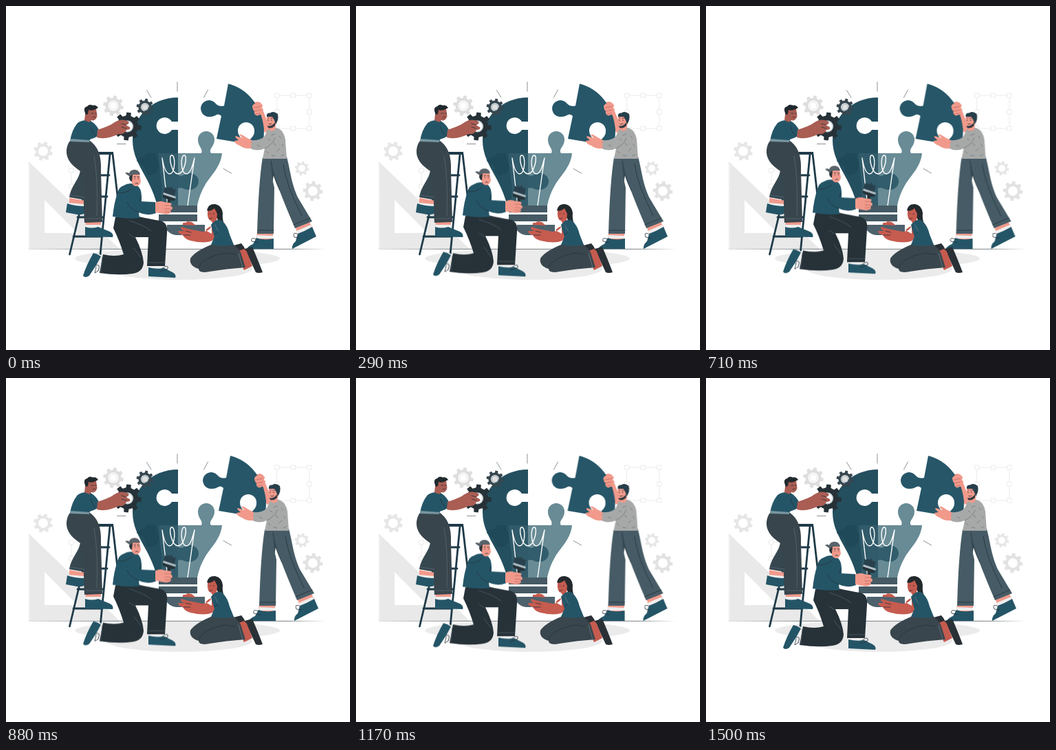
An HTML page for the animation above (1540 ms loop, 500 by 500 pixels).

```html
<!DOCTYPE html>
<html lang="en">
<head>
<meta charset="utf-8">
<title>Building an idea</title>
<style>
html, body { margin: 0; width: 100%; height: 100%; overflow: hidden; background: #fff; }
svg { display: block; width: 100%; height: 100%; }
.line { fill: none; stroke-linecap: round; stroke-linejoin: round; }
.teal { fill: #245567; }
.coal { fill: #29414c; }
.ink { stroke: #263238; stroke-width: .8; }
.pale { stroke: #78909c; stroke-width: .6; }
.tan { fill: #f19a8c; }
.brown { fill: #aa5d53; }
.red { fill: #c65b4f; }
</style>
</head>
<body>
<svg viewBox="0 0 500 500">
  <defs>
    <linearGradient id="fade">
      <stop offset="0" stop-color="#263238" stop-opacity=".08"/>
      <stop offset=".3" stop-color="#263238"/>
      <stop offset=".88" stop-color="#263238"/>
      <stop offset="1" stop-color="#263238" stop-opacity=".05"/>
    </linearGradient>
  </defs>

  <g id="back">
    <path fill="#e9e9e9" fill-rule="evenodd" d="M33 226V354H166ZM56 282L104 330H56Z"/>
    <path class="line" stroke="#fff" stroke-width="3" stroke-dasharray=".7 2.1" style="stroke-linecap:butt" d="M34 232V352"/>
    <g fill="#ebebeb">
      <ellipse cx="249" cy="367" rx="149" ry="14"/>
      <ellipse cx="252" cy="382" rx="106" ry="16"/>
    </g>
    <g id="frames" class="line" stroke="#e6e6e6" stroke-width=".8">
      <path d="M394 130H441V178H394ZM95 239H128M95 239V285"/>
    </g>
  </g>
  <rect x="33" y="352.9" width="430" height=".6" fill="url(#fade)"/>

  <g id="bulb">
    <path fill="#244f5f" d="M250 133C211 133 184 162 184 195C184 216 193 230 202 247C211 263 216 276 220 290H250V180H241A12 12 0 1 1 241 168H250Z"/>
    <path fill="#1f4858" d="M190 225C196 216 201 223 204 214H219C216 223 224 225 222 235C219 249 201 249 202 236C202 231 196 232 190 225Z"/>
    <path fill="#315b6a" d="M222 214H251V290H224C231 266 222 240 222 214Z"/>
    <path fill="#688b95" d="M250 214H284C287 207 279 205 279 194A12 12 0 0 1 303 194C303 205 294 207 298 214H314C312 234 298 246 290 259Q281 274 278 290H250Z"/>
    <path fill="#315d6c" d="M250 245C256 250 259 243 267 243A13 12 0 0 1 267 267C259 268 257 262 250 265Z"/>
    <path class="line" stroke="#fff" stroke-width="1.4" d="M235 290L227 221C229 233 232 244 238 244C246 244 247 217 241 217C235 217 241 244 250 244C259 244 265 217 259 217C253 217 254 244 262 244C268 244 271 233 274 221L264 290"/>
    <path fill="#455a64" d="M222 290H278V300H222ZM222 303H278V313H222Z"/>
    <path class="line" stroke="#8b9295" d="M204.500 122.500L211 133M249 110.500V124M293.500 122L287.500 133M316 236.500L327.500 243M161.500 200.500H174"/>
  </g>

  <g id="gears"></g>

  <g id="climber">
    <g class="line" stroke="#1f3b49" stroke-width="2.8">
      <path d="M131 214H156" stroke-width="4" style="stroke-linecap:butt"/>
      <path d="M127 216L92.500 361M151 216L137 361M155 215L166 310M116 246H150M113 277H147M104 307H142M98 335H140"/>
    </g>
    <path fill="#f19a8c" d="M92 279L115 283 113 291 92 288ZM116 313L138 313 138 321 115 322Z"/>
    <path fill="#eee" d="M91 286L114 288 114 292 90 290ZM115 318H139V322H115Z"/>
    <path class="teal" d="M89 287Q100 291 115 291L115 301Q111 304 103 303L87 300ZM115 321Q124 324 134 321L151 328Q157 331 155 336L115 335Z"/>
    <path fill="#37474f" d="M110 212C130 240 115 250 115 282L92 278C95 260 107 252 108 238Z"/>
    <path fill="#39454c" d="M93 196H122C135 205 139 221 138 240L140 314 114 315C112 286 115 262 108 240C94 231 87 221 88 209Q89 201 93 196Z"/>
    <path class="line pale" d="M116 309H138M94 275L114 278M128 218Q134 250 132 305" opacity=".6"/>
    <path class="teal" d="M104 170Q113 164 123 167Q132 172 137 184L130 191 122 194 121 198 93 197Q95 181 104 170Z"/>
    <path fill="#78959f" d="M94 193L121 195 121 198 93 197Z"/>
    <path class="brown" d="M133 180C142 177 151 174 158 169Q165 164 173 166L178 168Q180 172 174 173L180 176Q182 180 175 180Q173 187 164 186C153 191 143 194 132 191ZM116 150Q122 145 131 149L132.500 160Q130 168 124 166L121 169 114 166Z"/>
    <path fill="#20292e" d="M116 158Q111 147 118 146Q121 142 126 144.500Q131 143 134 148L130 150Q125 153 120 151L119 157Z"/>
    <path class="line ink" d="M124 156H127M129.500 156H131.500M126 162Q129 160 130 162M168 171L175 173M168 176L175 178M123 176Q126 186 132 190"/>
  </g>

  <g id="puzzler">
    <path class="tan" d="M358 146Q359 139 366 139Q373 140 372 148L376 158Q380 169 385 181L376 184 369 165Q360 158 360 153Z"/>
    <path fill="#265668" d="M323 113C351 120 372 145 375 179Q375 193 373 204L353 200C350 194 362 192 361 181A12 12 0 0 0 337 181C337 191 346 192 342 199L306 193 313 160C306 154 307 161 296 161A12 12 0 1 1 304 141Q309 147 317 145Z"/>
    <path class="tan" d="M358 145Q364 138 370 141L373 144Q374 147 370 147L374 150Q375 152.500 370 152L374 155Q373 158 369 158L365 159.500Q360 158 361 153Q358 150 358 145Z"/>
    <path class="line" stroke="#bd6a60" stroke-width=".8" d="M361 148L370 146M361 153L370 151M363 157L369 156"/>
    <path class="tan" d="M365 328L389 328 387 339 364 340ZM421 322L441 314 446 323 424 333Z"/>
    <path fill="#eee" d="M365 333L388 334 388 338 364 338ZM422 327L443 318 445 322 424 332Z"/>
    <path class="teal" d="M364 337Q373 341 389 338V353H350Q352 349 359 346ZM424 331Q435 327 445 321L451 335 416 353Q415 347 421 342Z"/>
    <path class="line ink" d="M364 339Q355 335 357 342L366 344M423 331Q416 328 419 336L427 337"/>
    <path fill="#35454e" d="M374 218L391 220 389 246 382 290 373 300Z"/>
    <path fill="#465b65" d="M382 219H408C414 242 414 255 424 278L445 313 420 323Q405 288 396 264Q386 243 382 219Z"/>
    <path fill="#465b65" d="M373 220L384 220Q386 249 390 264L389 331H365Q367 257 373 220Z"/>
    <path class="line" stroke="#24343d" stroke-width=".8" d="M385 225Q389 251 398 268M366 326H389M418 318L442 308M403 230Q407 260 430 305"/>
    <path fill="#a7a8a8" d="M380 180Q389 174 396 178Q404 182 406 194L408 222H373L376 207Q365 212 355 207L357 195Q370 196 376 189Z"/>
    <g class="line" stroke="#777d80" stroke-width=".9">
      <path d="M378 211L381 214M386 188L391 186M394 211L398 207M401 201L403 204M386 217L391 218M400 218L404 216M365 202L369 204M389 199L392 203M397 189L400 192M381 193L384 195"/>
      <path d="M376 207Q387 202 391 192"/>
    </g>
    <path class="tan" d="M357 195L349 191Q341 185 339 187L344 192 334 189Q331 190 338 195L332 196Q332 200 340 203Q346 208 356 207ZM379 161L391 159 393 169 391 180Q383 184 381 177Q377 175 379 161Z"/>
    <path fill="#263f4b" d="M379 161Q378 155 384 155.500Q389 152 395 157Q397 165 392 172L390 166 387 161Z"/>
    <path fill="#333c42" d="M380 174Q386 176 391 169L391 174Q386 179 381 177Z"/>
    <path class="line ink" d="M380.500 166H381.500M385.500 166H386.500M381 163L382 162.500M385 163L387 163M382 171.500Q384 173 386 171"/>
  </g>

  <g id="sitter">
    <path fill="#4d626d" d="M234 318H289V328Q282 333 269 333H247Q239 332 234 326Z"/>
    <path fill="#22292d" d="M292 297Q294 287 304 288Q314 290 315 301Q314 309 317 317Q310 317 307 309L302 302Z"/>
    <path class="red" d="M299 320Q296 327 286 328L265 324 255 321Q252 324 259 327L250 327Q250 331 257 333Q260 339 268 341Q289 346 300 341L309 330ZM257 318Q256 314 261 315L264 313 270 314 276 319ZM290 326Q294 321 299 320V331ZM293 298Q299 298 303 294L307 302 306 313 302 318 298 312Q292 311 293 298Z"/>
    <path fill="#293136" d="M331 348L342 345Q346 349 348 355L338 361ZM347 353L358 350Q367 371 373 387Q367 389 363 387Z"/>
    <path class="red" d="M333 358L346 353 350 357 358 378 346 384Z"/>
    <path fill="#3a464d" d="M298 347H331Q336 351 341 358L348 380Q319 382 296 386Q280 389 280 382Q266 378 268 367Q274 357 298 347Z"/>
    <path class="teal" d="M298 318Q306 308 314 312Q322 319 325 332L331 347Q314 350 298 347L303 335Q300 327 298 318Z"/>
    <path class="line ink" d="M280 380Q286 365 319 359L333 361M296 302H297M301 302H302.500M296 309Q299 310 300 308M261 327L269 329M258 333L268 333M303 333Q307 329 309 327"/>
    <path class="line pale" d="M338 359L344 380M304 318Q307 326 309 328"/>
  </g>

  <g id="painter">
    <path class="coal" d="M231 263L234 265 235 262 238 265 241 262 242 266 247 267 244 278 228 273Z"/>
    <path fill="#b0bec5" d="M229 271L247 277 246 280 228 274Z"/>
    <path fill="#263238" d="M228 274L246 280 245 283 239 283 238 289 234 288 235 281 228 278Z"/>
    <path fill="#eee" d="M134 360L140 363 137 388 131 384ZM207 376H231V382H207Z"/>
    <path class="tan" d="M208 373H230V377H208Z"/>
    <path class="teal" d="M127 359Q133 360 138 364L131 377 121 392Q115 396 112 392Q117 376 127 359ZM207 380Q219 383 230 381L242 387Q248 390 246 395L207 393Z"/>
    <path class="line ink" d="M131 377Q138 374 134 385L129 388 131 379M226 382Q237 374 235 382L224 386"/>
    <path fill="#263238" d="M159 307L193 306Q211 310 224 312Q236 315 234 330L231 378H205L207 336 188 336Q199 358 200 373Q199 387 184 389Q163 392 136 388L141 361Q158 365 171 361Q165 341 156 323Z"/>
    <path class="line" stroke="#53636c" stroke-width=".7" d="M140 365L138 386M207 373H231M179 312Q202 319 211 327M187 337L179 332M196 366L186 352"/>
    <path class="teal" d="M171 261Q182 254 193 263Q198 269 197 284L217 285 218 301Q205 306 193 300L194 308Q174 310 155 306Q157 286 162 272Q164 263 171 261Z"/>
    <path class="line ink" d="M193 300Q180 295 176 285M163 271Q172 274 182 266M195 278L194 284"/>
    <path class="tan" d="M217 286Q224 282 230 285L238 286Q243 287 239 290L242 293Q242 296 239 297L240 300Q236 304 228 302L217 300ZM181 245L194 244 196 255Q194 263 188 262Q181 260 181 245Z"/>
    <path class="line" stroke="#bd6a60" stroke-width=".8" d="M231 290H238M231 295H239M231 299H238"/>
    <path fill="#29343a" d="M180 245H184L183 255Q180 255 179 250Z"/>
    <path fill="#59636a" d="M179 243Q181 237.500 188 238Q194 239 195 245L184 245 180 248 173 243Q176 241 179 243Z"/>
    <path class="line ink" d="M187 251H188M192 251H193M188 258Q190 256.500 192 258M186 248.500L188.500 248M191 248.500H193.500"/>
  </g>
</svg>
<script>
const NS = 'http://www.w3.org/2000/svg';
const $ = id => document.getElementById(id);

function add(parent, tag, attrs) {
  const el = document.createElementNS(NS, tag);
  for (const key in attrs) el.setAttribute(key, attrs[key]);
  return parent.appendChild(el);
}

// A toothed ring with a round hole.
function gear(parent, x, y, r, hole, fill, turn = 0) {
  const pts = [];
  const teeth = 8, step = 2 * Math.PI / teeth;
  for (let i = 0; i < teeth; i++) {
    for (const [a, k] of [[-.29, .77], [-.2, 1], [.2, 1], [.29, .77]]) {
      const angle = turn + (i + a) * step;
      pts.push((x + r * k * Math.cos(angle)).toFixed(2) + ' ' + (y + r * k * Math.sin(angle)).toFixed(2));
    }
  }
  const ring = `M${x - hole} ${y}a${hole} ${hole} 0 1 0 ${2 * hole} 0a${hole} ${hole} 0 1 0 ${-2 * hole} 0Z`;
  add(parent, 'path', { d: `M${pts.join('L')}Z${ring}`, fill, 'fill-rule': 'evenodd' });
}

const back = $('back'), gears = $('gears');
gear(back, 156, 145, 15, 7.5, '#dedede', .2);
gear(back, 54, 211, 14, 7, '#e6e6e6', .3);
gear(back, 430, 236, 10.5, 5, '#e6e6e6', .2);
gear(back, 446, 269, 14.5, 7, '#e2e2e2', .1);
add(back, 'circle', { cx: 156, cy: 145, r: 5.5, fill: 'none', stroke: '#e4e4e4' });

gear(gears, 202, 147, 12.5, 6, '#37474f', .2);
add(gears, 'circle', { cx: 202, cy: 147, r: 4.8, fill: '#e0e0e0', stroke: '#90a4ae' });
gear(gears, 176.5, 175, 20.5, 8.5, '#263238', .1);
add(gears, 'circle', { cx: 176.5, cy: 175, r: 7.5, fill: '#fff', stroke: '#90a4ae', 'stroke-width': .7 });

const handles = [[95, 239], [95, 262]];
for (const x of [394, 417.5, 441])
  for (const y of [130, 154, 178])
    if (x !== 417.5 || y !== 154) handles.push([x, y]);
for (const [x, y] of handles)
  add($('frames'), 'rect', { x: x - 3, y: y - 3, width: 6, height: 6, fill: '#fff' });

// Each step is [offset, x, y].
function move(id, easing, steps) {
  $(id).animate(
    steps.map(([offset, x, y]) => ({ offset, easing, transform: `translate(${x}px, ${y}px)` })),
    { duration: 1540, iterations: Infinity }
  );
}

move('puzzler', 'ease', [
  [0, 0, 0], [.1, -1, 0], [.2, 2, 0], [.3, -2, 0], [.4, 3.3, 0], [.5, -2, 0],
  [.6, 3.3, 0], [.7, -2, 0], [.8, 2, 0], [.9, -1, 0], [1, 0, 0]
]);
move('painter', 'ease-in-out', [[0, 0, 0], [.5, 0, -5.8], [1, 0, 0]]);
</script>
</body>
</html>
```
